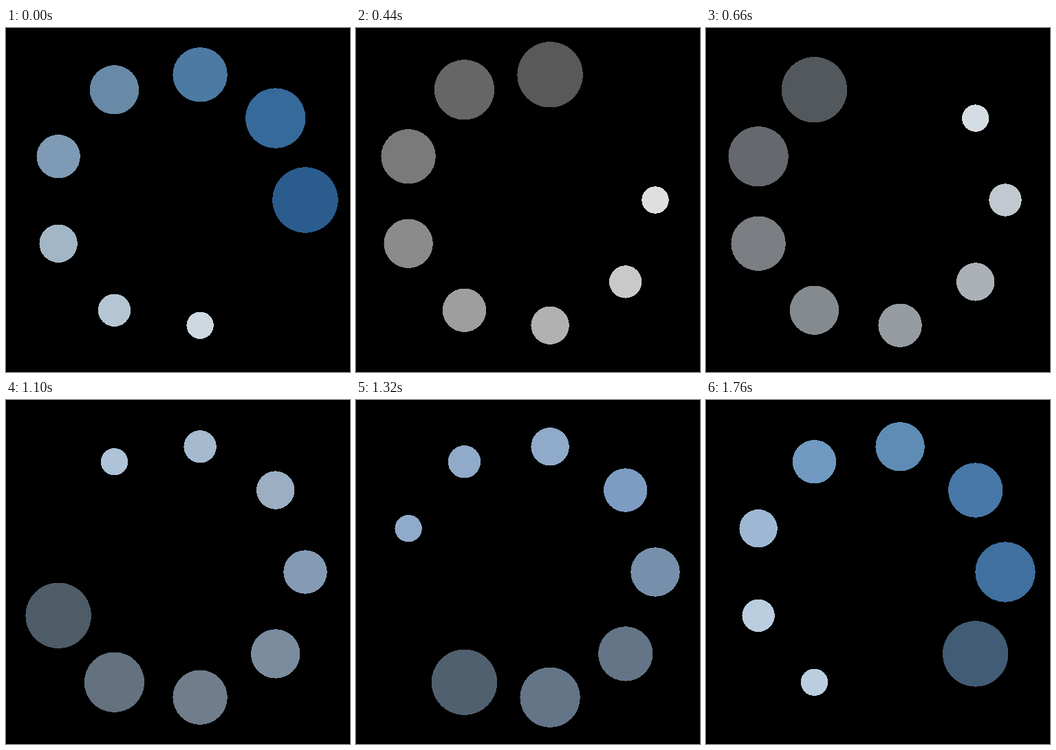
An HTML page that plays this animation: 500x500 px, repeating every 1.98 s.

```html
<!DOCTYPE html>
<html lang="en">
<head>
<meta charset="utf-8">
<title>Spinner</title>
<style>
  html, body { margin: 0; width: 100%; height: 100%; overflow: hidden; background: #000; }
  svg { display: block; width: 100%; height: 100%; }
</style>
</head>
<body>
<svg id="stage" viewBox="0 0 500 500" shape-rendering="crispEdges"></svg>
<script>
  const STEP = 220, SLOTS = 9, DOTS = 8;
  const CENTER = 250, RING = 185;

  // Dot colours, largest to smallest
  const blue = '2a5d8d 366a9a 4c7aa2 698aa6 7f9ab4 a3b6c6 b4c6d3 cdd8e1'.split(' ');
  const deep = '23598f 2b6296 4b7094 5e7fa0 5e7fa0 5e7fa0 5e7fa0 5e7fa0'.split(' ');
  const grey = '595959 666666 7a7a7a 8b8b8b 9e9e9e b1b1b1 c9c9c9 dfdfdf'.split(' ');
  const slate = '4c5761 636c76 7b848d 7e8890 8e99a4 a5b1bb b9c7d4 cbd9e6'.split(' ');
  const steel = '50606e 647587 647587 7690ac 7c9cc2 90abc9 90abc9 90abc9'.split(' ');
  const sky = '425c75 3f70a0 4878a7 5f8cb5 709ac2 9eb8d4 bbcee0 bbcee0'.split(' ');

  const channels = hex => [0, 2, 4].map(i => parseInt(hex.slice(i, i + 2), 16));
  const mix = (a, b) => a.map((hex, i) => {
    const other = channels(b[i]);
    return channels(hex)
      .map((v, c) => Math.round((v + other[c]) / 2).toString(16).padStart(2, '0'))
      .join('');
  });

  const palettes = [
    blue, deep, grey, mix(grey, slate), slate,
    mix(slate, steel), steel, mix(steel, sky), sky
  ];

  const stage = document.getElementById('stage');
  const dots = Array.from({ length: DOTS }, (_, i) => {
    const dot = document.createElementNS('http://www.w3.org/2000/svg', 'circle');
    dot.setAttribute('r', 47.7 - 4 * i);
    return stage.appendChild(dot);
  });

  let shown = -1;

  function draw(step) {
    dots.forEach((dot, i) => {
      const angle = (step + i) * 2 * Math.PI / SLOTS;
      dot.setAttribute('cx', CENTER + RING * Math.cos(angle));
      dot.setAttribute('cy', CENTER - RING * Math.sin(angle));
      dot.setAttribute('fill', '#' + palettes[step][i]);
    });
  }

  function tick(now) {
    const step = Math.floor(now / STEP) % SLOTS;
    if (step !== shown) draw(shown = step);
    requestAnimationFrame(tick);
  }

  draw(0);
  requestAnimationFrame(tick);
</script>
</body>
</html>
```
